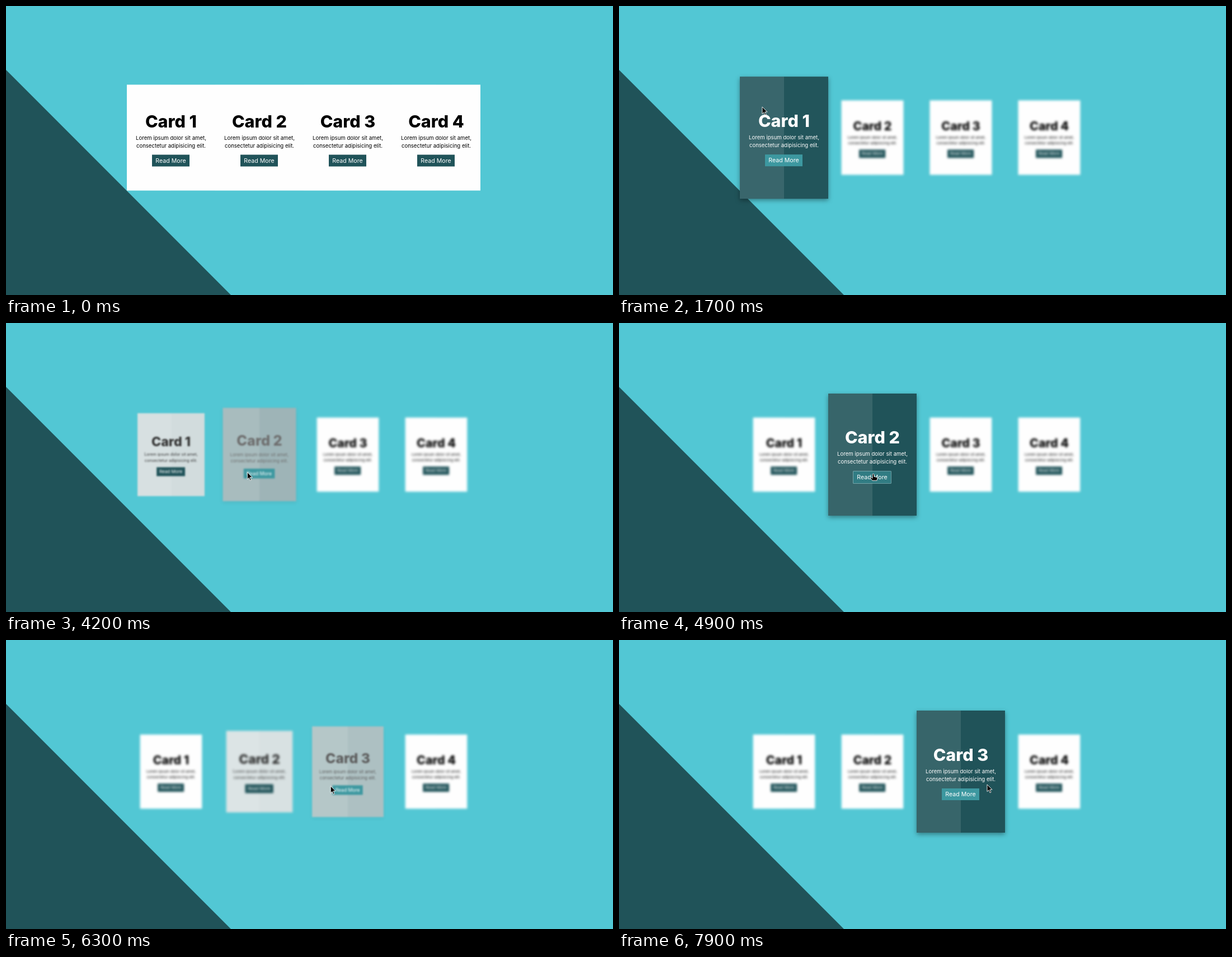
Recreate the animation shown at these times as an HTML page. Size 1085 px wide and 516 px high, loop 8000 ms.

```html
<!DOCTYPE html>
<html lang="en">
<head>
<meta charset="utf-8">
<title>Hover cards</title>
<style>
  :root { --sky: #52c7d4; --deep: #205359; --teal: #3d98a0; }
  html, body { margin: 0; width: 100%; height: 100%; overflow: hidden; }
  body { position: relative; background: var(--sky); font-family: Inter, sans-serif; }
  .corner {
    position: absolute; left: 0; top: 114px; width: 402px; height: 402px;
    background: var(--deep); clip-path: polygon(0 0, 100% 100%, 0 100%);
  }
  /* --h: card hover, --s: shrink, --b: button hover */
  .card {
    --h: 0; --s: 0; --b: 0;
    position: absolute; top: 235px; width: 158px;
    height: calc(189px + var(--h) * 29px);
    transform: translateY(-50%) scale(calc(1 - var(--s) * .3));
    background: color-mix(in srgb, var(--deep) calc(var(--h) * 100%), #fefefe);
    color: color-mix(in srgb, #fff calc(var(--h) * 100%), #000);
    box-shadow: 0 3px 8px rgb(0 0 0 / calc(var(--h) * var(--h) * .38));
    text-align: center;
  }
  .card::before {
    content: ""; position: absolute; inset: 0 50% 0 0;
    background: rgb(255 255 255 / .1);
  }
  .body { position: absolute; left: 0; top: 50%; width: 100%; height: 0; }
  .body > * { position: absolute; margin: 0; white-space: nowrap; }
  h2, p { left: 0; width: 100%; transform: translateY(calc(var(--b) * -1.3px)); }
  h2 { top: -50px; font-size: 30.5px; font-weight: 800; line-height: 40px; }
  p { top: -7px; font-size: 9.6px; line-height: 14px; }
  .more {
    left: 45px; top: 30px; width: 67px; height: 21px;
    font-size: 10.6px; line-height: 21px; color: #fff; background: var(--deep);
  }
  .active .more {
    background: color-mix(in srgb, var(--deep) calc(var(--b) * 100%), var(--teal));
    box-shadow: 0 0 0 calc(var(--b) * 1.2px)
      color-mix(in srgb, var(--sky) calc(var(--b) * 100%), #fff);
  }
  .cursor { position: absolute; left: 0; top: 0; overflow: visible; }
  .cursor path { fill: #000; stroke: #fff; stroke-width: .9; stroke-linejoin: round; }
</style>
</head>
<body>
<div class="corner"></div>
<svg class="cursor" width="1" height="1">
  <path id="arrow" d="M0 0V12.6L2.9 9.9 5 14.7 7 13.8 4.9 9.1H9Z"/>
  <path id="hand" d="M-1.5 1Q0-.8 1.5 1V5L6 6Q7.5 6.5 7.5 8L6.5 12H-1.5L-5.5 7.5Q-5.5 6-4 6L-1.5 8Z"/>
</svg>
<script>
const LOOP = 8000, STEP = 100, CARD_MS = 500, BUTTON_MS = 400;
const OPEN = 1265, APPEAR = 500;

// When the pointer enters and leaves each card and its button.
const visits = [
  { enter: OPEN, leave: 3950, press: 2800, release: 3750 },
  { enter: 4070, leave: 6035, press: 4800, release: 5800 },
  { enter: 6185, leave: LOOP, press: 6930, release: 7700 },
  { enter: LOOP, leave: LOOP, press: LOOP, release: LOOP }
];

// Pointer moves, each slowing down to a stop.
const origin = { x: 110, y: -7 };
const moves = [
  { from: 400, to: 700, x: 176, y: 47 },
  { from: 800, to: 1700, x: 256, y: 180 },
  { from: 2200, to: 3100, x: 298, y: 283 },
  { from: 3600, to: 4500, x: 452, y: 264 },
  { from: 4800, to: 5300, x: 460, y: 281 },
  { from: 5700, to: 5800, x: 495, y: 274 },
  { from: 5900, to: 6600, x: 604, y: 257 },
  { from: 6700, to: 7300, x: 622, y: 280 },
  { from: 7600, to: 7900, x: 658, y: 258 }
];

const clamp = v => Math.min(1, Math.max(0, v));
const slowDown = v => Math.sin(clamp(v) * Math.PI / 2);

// The CSS "ease" curve, solved by bisection.
function ease(x) {
  if (x <= 0 || x >= 1) return clamp(x);
  const bez = (u, a, b) => 3 * u * (1 - u) ** 2 * a + 3 * u * u * (1 - u) * b + u ** 3;
  let lo = 0, hi = 1;
  for (let i = 0; i < 24; i++) {
    const mid = (lo + hi) / 2;
    if (bez(mid, .25, .25) < x) lo = mid; else hi = mid;
  }
  return bez(lo, .1, 1);
}

const cursor = document.querySelector(".cursor");
const arrow = document.getElementById("arrow");
const hand = document.getElementById("hand");

const cards = visits.map((visit, i) => {
  const el = document.createElement("div");
  el.className = "card";
  el.style.left = 216 + i * 158 + "px";
  el.innerHTML = `<div class="body"><h2>Card ${i + 1}</h2>
    <p>Lorem ipsum dolor sit amet,<br>consectetur adipisicing elit.</p>
    <div class="more">Read More</div></div>`;
  document.body.insertBefore(el, cursor);
  return { el, ...visit };
});

function drawCard({ el, enter, leave, press, release }, t) {
  const since = start => ease((t - start) / CARD_MS);
  const h = since(enter) - since(leave);
  const s = since(OPEN) - h;
  const pressed = t >= press && t < release;
  const b = pressed ? ease((t - press) / BUTTON_MS) : 0;
  el.style.setProperty("--h", h.toFixed(4));
  el.style.setProperty("--s", s.toFixed(4));
  el.style.setProperty("--b", b.toFixed(4));
  el.style.filter = s > .001 ? `blur(${(s * 3).toFixed(3)}px)` : "none";
  el.classList.toggle("active", t >= enter && t < leave);
  return pressed;
}

function drawCursor(t, pointing) {
  let { x, y } = origin;
  for (const m of moves) {
    const k = slowDown((t - m.from) / (m.to - m.from));
    x += (m.x - x) * k;
    y += (m.y - y) * k;
  }
  cursor.style.display = t >= APPEAR ? "" : "none";
  cursor.style.transform = `translate(${x}px, ${y}px)`;
  arrow.style.display = pointing ? "none" : "";
  hand.style.display = pointing ? "" : "none";
}

function draw() {
  const t = Math.floor(performance.now() % LOOP / STEP) * STEP;
  const pointing = cards.map(c => drawCard(c, t)).includes(true);
  drawCursor(t, pointing);
  requestAnimationFrame(draw);
}
draw();
</script>
</body>
</html>
```
